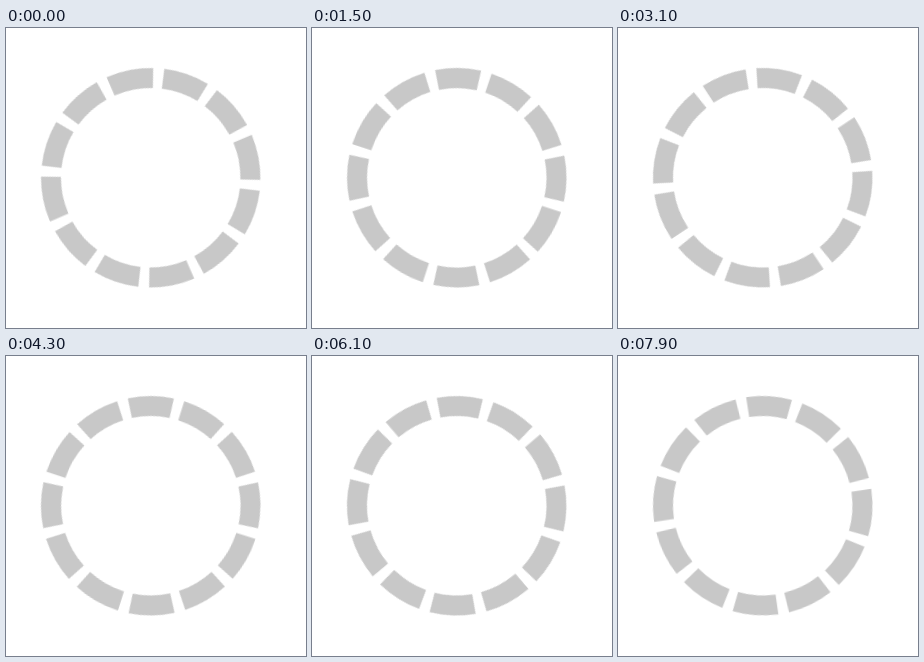
These frames come from a looping animation (300x300 px, 8 s). An HTML page:

```html
<!DOCTYPE html>
<html lang="en">
<head>
<meta charset="utf-8">
<title>Rotating dashed ring</title>
<style>
  html, body { margin: 0; width: 100%; height: 100%; overflow: hidden; background: #fff; }
  svg { display: block; width: 100vw; height: 100vh; }
  #ring {
    fill: none;
    stroke: #c8c8c8;
    stroke-width: 20;
    stroke-dasharray: 42 10;
    transform-box: view-box;
    transform-origin: 144.75px 149.75px;
  }
</style>
</head>
<body>
<svg viewBox="0 0 300 300">
  <circle id="ring" cx="144.75" cy="149.75" r="99.75"/>
</svg>
<script>
  const LOOP = 8000;        // ms
  const STEP = 100;         // ms per pose
  const SPEED = -32.3;      // degrees per second
  const START = -112.8;     // degrees, where the first dash begins

  const turn = deg => ({ transform: `rotate(${deg}deg)` });

  // The small negative delay keeps step edges clear of rounding.
  document.getElementById('ring').animate(
    [turn(START), turn(START + SPEED * LOOP / 1000)],
    { duration: LOOP, iterations: Infinity, delay: -1, easing: `steps(${LOOP / STEP}, end)` }
  );
</script>
</body>
</html>
```
